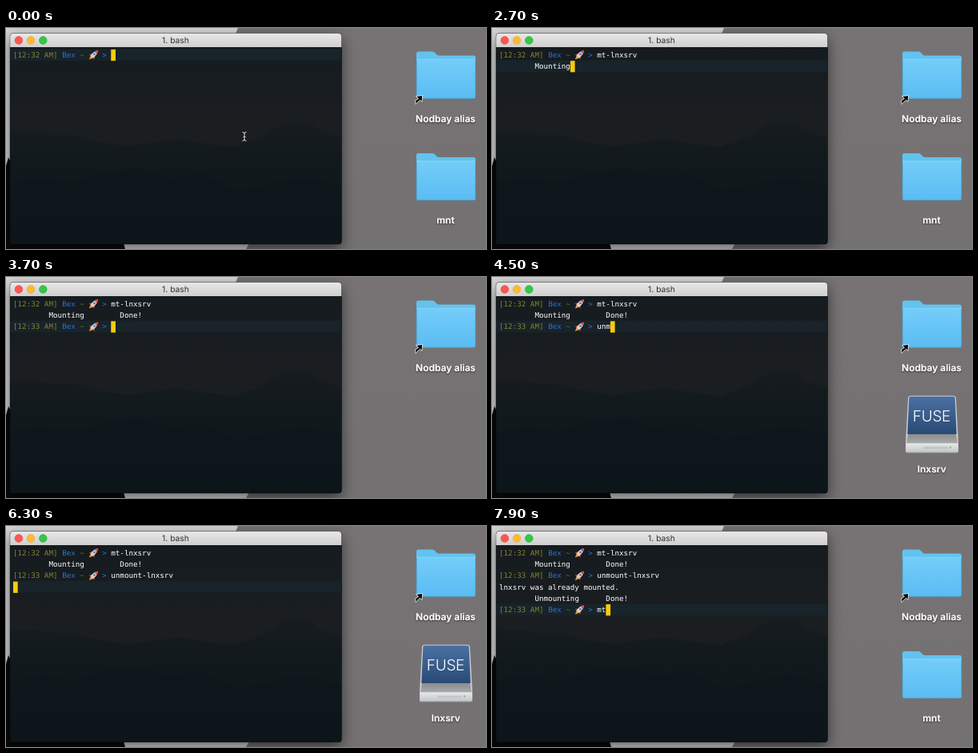
Recreate the animation shown at these times as an HTML page. Size 600 by 277 pixels, loop 8 s.

```html
<!DOCTYPE html>
<html lang="en">
<head>
<meta charset="utf-8">
<title>Mount from the terminal</title>
<style>
  html, body { margin: 0; width: 100%; height: 100%; overflow: hidden; background: #757273; }
  svg { display: block; width: 600px; height: 277px; }
  text { text-rendering: geometricPrecision; white-space: pre; }
  .mono { font: 9.23px "DejaVu Sans Mono", monospace; fill: #fff; }
  .mono .time { fill: #85822b; }
  .mono .user { fill: #2a70d8; }
  .mono .path { fill: #477f2c; }
  .title { font: 10.3px Inter, sans-serif; fill: #303030; text-anchor: middle; }
  .label { font: 600 12px Inter, sans-serif; fill: #fff; text-anchor: middle; filter: url(#textShade); }
  .fuse { font: 300 19px Inter, sans-serif; letter-spacing: -.3px; fill: #fff; text-anchor: middle; }
</style>
</head>
<body>
<svg viewBox="0 0 600 277">
  <defs>
    <linearGradient id="desk" x2="0" y2="1">
      <stop stop-color="#777374"/><stop offset="1" stop-color="#747172"/>
    </linearGradient>
    <linearGradient id="bar" x2="0" y2="1">
      <stop stop-color="#e9e8e9"/><stop offset="1" stop-color="#d0cfd0"/>
    </linearGradient>
    <linearGradient id="sky" x2="0" y2="1">
      <stop stop-color="#151b1f"/><stop offset=".42" stop-color="#1b1e21"/><stop offset="1" stop-color="#151b1f"/>
    </linearGradient>
    <linearGradient id="hills" x2="0" y2="1">
      <stop stop-color="#171c20"/><stop offset=".35" stop-color="#11191d"/><stop offset="1" stop-color="#0c151a"/>
    </linearGradient>
    <linearGradient id="front" x2="0" y2="1">
      <stop stop-color="#74cdf9"/><stop offset="1" stop-color="#5abcf3"/>
    </linearGradient>
    <linearGradient id="panel" x2="0" y2="1">
      <stop stop-color="#4a70a2"/><stop offset="1" stop-color="#294a74"/>
    </linearGradient>
    <linearGradient id="slope" x2="0" y2="1">
      <stop stop-color="#858686"/><stop offset="1" stop-color="#a9aaab"/>
    </linearGradient>
    <linearGradient id="metal" x2="0" y2="1">
      <stop stop-color="#e6e8e9"/><stop offset="1" stop-color="#c3c6c8"/>
    </linearGradient>
    <filter id="textShade" x="-20%" y="-30%" width="140%" height="180%">
      <feDropShadow dx="0" dy="1" stdDeviation=".9" flood-color="#000" flood-opacity=".65"/>
    </filter>
    <filter id="winShade" x="-12%" y="-12%" width="124%" height="130%">
      <feDropShadow dx="0" dy="6" stdDeviation="9" flood-color="#000" flood-opacity=".55"/>
    </filter>
    <clipPath id="screen"><path d="M5 24H419.500V267q0 4-4 4H9q-4 0-4-4z"/></clipPath>
    <path id="frame" d="M5 11q0-4.500 4.500-4.500H415q4.500 0 4.500 4.500V267q0 4-4 4H9q-4 0-4-4z"/>
    <g id="folder">
      <path d="M513 32q0-2.500 2.500-2.500H533q2 0 3.200 1.500l2 2.300q1 1.200 3 1.200H584.500q2.500 0 2.500 2.500V86H513z" fill="#62c3ef"/>
      <path d="M513 40.500q0-1.500 1.500-1.500H585.500q1.500 0 1.500 1.500V86q0 2.500-2.500 2.500H515.500q-2.500 0-2.500-2.500z" fill="url(#front)"/>
      <path d="M513.500 39.300H586.500" stroke="#8fdafc" stroke-width=".7"/>
      <path d="M513.300 40V86q0 2.200 2.200 2.200H584.500q2.200 0 2.200-2.200V40" fill="none" stroke="#459fd0" stroke-width=".7"/>
    </g>
  </defs>

  <!-- desktop -->
  <rect width="600" height="277" fill="url(#desk)"/>
  <path d="M0 0H290L287 7 304 270 300 277H0z" fill="#d5d5d6"/>
  <path d="M0 173L3 162 6 168V266H146L149 277H0z" fill="#080808"/>

  <!-- window -->
  <use href="#frame" fill="#141a1e" filter="url(#winShade)"/>
  <path d="M5 24V11q0-4.500 4.500-4.500H415q4.500 0 4.500 4.500V24z" fill="url(#bar)"/>
  <circle cx="15.900" cy="15.500" r="4.900" fill="#fb5652" stroke="#df4643" stroke-width=".5"/>
  <circle cx="31" cy="15.500" r="4.900" fill="#fdb930" stroke="#dda033" stroke-width=".5"/>
  <circle cx="46.300" cy="15.500" r="4.900" fill="#33c748" stroke="#27aa35" stroke-width=".5"/>
  <text class="title" x="212" y="19.200">1. bash</text>
  <g clip-path="url(#screen)">
    <rect x="5" y="24" width="415" height="248" fill="url(#sky)"/>
    <path d="M5 131L38 130 62 134 88 134 112 142 150 148 186 143 216 139 250 145 286 149 318 137 338 125 345 119 362 116 382 118 390 128 404 133 419 137V272H5z" fill="url(#hills)"/>
    <path d="M5 194L45 187 84 194 120 182 166 176 205 188 244 182 290 205 332 194 372 187 419 198V272H5z" fill="#0d161b" opacity=".6"/>
    <rect id="band" x="5" width="415" height="14.800" fill="#18232a"/>
    <rect id="caret" width="5.700" height="14.200" fill="#fbcb0a"/>
    <g id="output" class="mono"></g>
  </g>
  <use href="#frame" fill="none" stroke="#000" stroke-opacity=".35" stroke-width=".8"/>
  <path id="pointer" d="M295.500 130.500q2.500 0 2.500 2V139.500q0 2-2.500 2M300.500 130.500q-2.500 0-2.500 2M298 139.500q0 2 2.500 2M296.500 136.500H299.500" fill="none" stroke="#d9dadb" stroke-width="1"/>

  <!-- icons -->
  <use href="#folder"/>
  <path d="M512 95.500L511.500 91 515.500 88.500 512.500 85.500 520.700 84.500 520 92.500 517.500 90.300z" fill="#080808" stroke="#fff" stroke-width=".8"/>
  <text class="label" x="549.500" y="118">Nodbay alias</text>
  <g id="mnt">
    <use href="#folder" y="127.500"/>
    <text class="label" x="549.500" y="245">mnt</text>
  </g>
  <g id="drive">
    <path d="M523 148.800H577q2.500 0 2.900 2.500L583 208V217.500q0 3-3 3H520q-3 0-3-3V208L520.100 151.300q.4-2.500 2.900-2.500z" fill="#c9cccf"/>
    <path d="M520.500 195H579.500L582 208.500H518z" fill="url(#slope)"/>
    <path d="M523.500 149.800H576.500q2 0 2.200 2L580.700 197H519.300L521.300 151.800q.2-2 2.200-2z" fill="url(#panel)"/>
    <path d="M517.500 208.500H582.500V217.500q0 2.500-2.500 2.500H520q-2.500 0-2.500-2.500z" fill="url(#metal)"/>
    <path d="M518.500 220.200H581.500" stroke="#7d8083" stroke-width=".8"/>
    <path d="M540 214H570" stroke="#b1b4b6" stroke-width="3" stroke-dasharray="1 1"/>
    <circle cx="573" cy="213.500" r="1.200" fill="#75c66b"/>
    <text class="fuse" x="549.500" y="180.800">FUSE</text>
    <text class="label" x="549.800" y="245.300">lnxsrv</text>
  </g>
</svg>

<script>
const LOOP = 8000, LEFT = 9, TOP = 26.3, CELL = 5.557, ROW = 14.25, CMD = 22;
const NS = "http://www.w3.org/2000/svg";
const $ = id => document.getElementById(id);
const colX = col => LEFT + col * CELL;
const set = (el, attrs) => { for (const k in attrs) el.setAttribute(k, attrs[k]); };
const show = (el, on) => el.style.visibility = on ? "visible" : "hidden";

// Last entry whose time has passed
const latest = (table, t) => table.filter(e => e[0] <= t).pop();

function add(tag, parent, attrs) {
  const el = parent.appendChild(document.createElementNS(NS, tag));
  set(el, attrs);
  return el;
}

function print(parent, row, col, str, cls = "") {
  const el = add("text", parent, { x: colX(col), y: TOP + row * ROW + 10.5, class: cls });
  el.textContent = str;
  return el;
}

function rocket(parent, x, y) {
  const g = add("g", parent, { transform: `translate(${x} ${y}) rotate(45) scale(1.12)` });
  const part = (d, fill) => add("path", g, { d, fill });
  part("M-2 3L0 7.500 2 3z", "#f3a02b");
  part("M-2 0L-4.200 3.800-1.500 3zM2 0L4.200 3.800 1.500 3z", "#d83a35");
  part("M0-6.500Q3-3 2 3.500H-2Q-3-3 0-6.500z", "#ccd3d8");
  part("M0-6.500Q1.400-5 1.900-3H-1.900Q-1.400-5 0-6.500z", "#dc4841");
  add("circle", g, { cy: -.8, r: 1.2, fill: "#3d78ad" });
}

function prompt(parent, row, clock) {
  print(parent, row, 0, `[${clock} AM]`, "time");
  print(parent, row, 11, "Bex", "user");
  print(parent, row, 15, "~", "path");
  rocket(parent, colX(18) + .8, TOP + row * ROW + 7.2);
  print(parent, row, 20, ">", "user");
}

// [time, row, clock]
const PROMPTS = [[0, 0, "12:32"], [3300, 2, "12:33"], [6700, 5, "12:33"]];

// [time, row, column, text]
const LINES = [
  [2400, 1, 8, "Mounting"], [3200, 1, 24, "Done!"],
  [6400, 3, 0, "lnxsrv was already mounted."],
  [6500, 4, 8, "Unmounting"], [6600, 4, 24, "Done!"]
];

// Typed commands by row; the long jumps are tab completions
const TYPED = {
  0: [[0, ""], [800, "m"], [1000, "mt"], [1300, "mt-"], [1700, "mt-lnxsrv "]],
  2: [[3300, ""], [4000, "u"], [4200, "un"], [4500, "unm"], [4700, "unmo"],
      [4900, "unmou"], [5200, "unmount-lnxsrv "]],
  5: [[6700, ""], [7400, "m"], [7700, "mt"]]
};

// [time, row, column]
const CARET = [
  [2000, 1, 0], [2400, 1, 16], [3200, 1, 29], [6000, 3, 0],
  [6400, 4, 0], [6500, 4, 18], [6600, 4, 29]
];
for (const row in TYPED)
  for (const [at, str] of TYPED[row]) CARET.push([at, +row, CMD + str.length]);
CARET.sort((a, b) => a[0] - b[0]);

const output = $("output");
const timed = [];
for (const [at, row, clock] of PROMPTS) {
  const el = add("g", output, {});
  prompt(el, row, clock);
  timed.push([at, el]);
}
for (const [at, ...line] of LINES) timed.push([at, print(output, ...line)]);
const inputs = Object.entries(TYPED).map(([row, keys]) => [keys, print(output, +row, CMD, "")]);

function draw(t) {
  for (const [at, el] of timed) show(el, t >= at);
  for (const [keys, el] of inputs) {
    const key = latest(keys, t);
    el.textContent = key ? key[1] : "";
  }
  const [, row, col] = latest(CARET, t);
  set($("band"), { y: TOP + row * ROW - .2 });
  set($("caret"), { x: colX(col), y: TOP + row * ROW + .6 });
  show($("pointer"), t < 800);
  show($("mnt"), t < 3200 || t >= 6700);
  show($("drive"), t >= 4500 && t < 6600);
}

const start = performance.now();
function tick() {
  draw((performance.now() - start) % LOOP);
  requestAnimationFrame(tick);
}
draw(0);
requestAnimationFrame(tick);
</script>
</body>
</html>
```
